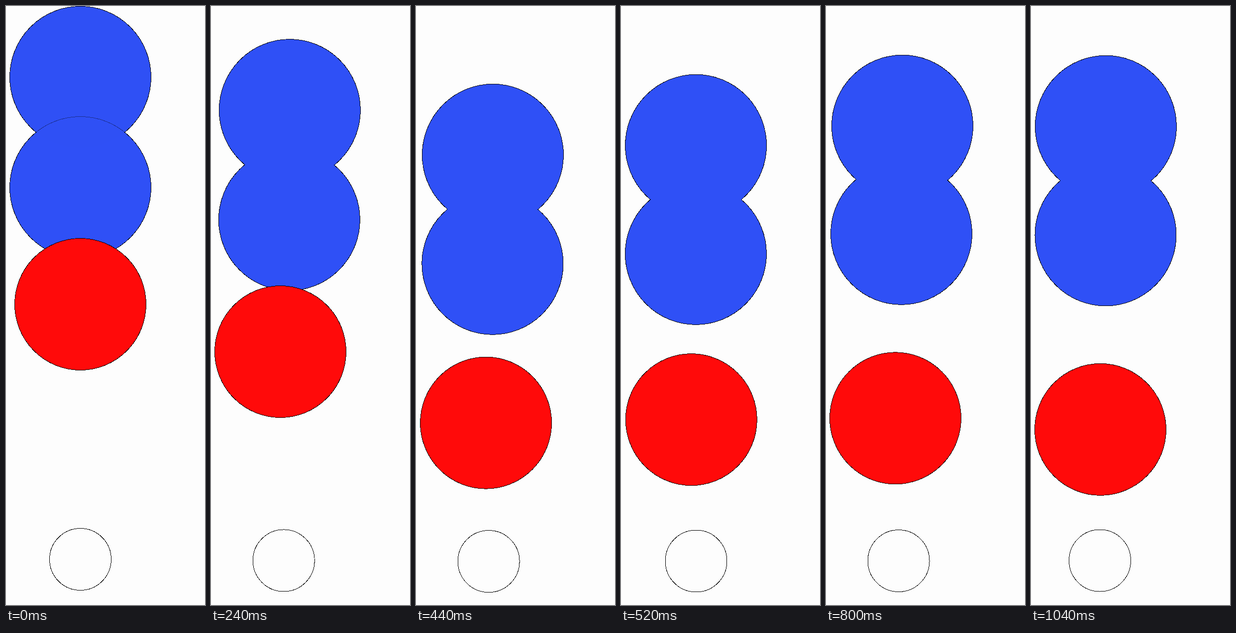
Write an HTML page that moves like this. It is 400x1200 px and loops after 1.08 s.

```html
<!DOCTYPE html>
<html lang="en">
<head>
<meta charset="utf-8">
<title>Bouncing balls</title>
<style>
  html, body { margin: 0; width: 100%; height: 100%; overflow: hidden; background: #fdfdfd; }
  svg { display: block; width: 100vw; height: 100vh; }
  circle { stroke: #000; stroke-width: 1; shape-rendering: crispEdges; }
  .blue { fill: #2f50f6; }
  .red { fill: #ff0a0a; }
  .small { fill: none; }
  #cover { stroke: none; }
</style>
</head>
<body>
<svg viewBox="0 0 400 1200">
  <circle id="top" class="blue" r="142"/>
  <circle id="mid" class="blue" r="142"/>
  <circle id="cover" class="blue" r="141.5"/>
  <circle id="red" class="red" r="132"/>
  <circle id="small" class="small" r="62"/>
</svg>
<script>
const LOOP = 1080, STEP = 40, HIT = 360, HALF = LOOP / 2, WALL = 7;
const BLUE_X = WALL + 142.5, RED_X = WALL + 132.5;

// Accelerating fall until the hit, then free flight with speed v and gravity g
function flight(t, { start, drop, power, base = start + drop, v, g }) {
  if (t <= HIT) return start + drop * (t / HIT) ** power;
  const s = t - HIT;
  return base + v * s + g * s * s / 2;
}

// Sideways arc away from the left wall
function hop(t, from, to, size) {
  return t > from && t < to ? size * Math.sin(Math.PI * (t - from) / (to - from)) : 0;
}

const blueX = (t, first, second) =>
  BLUE_X + hop(t, 0, HALF, first) + hop(t, HALF, LOOP, second);

const balls = {
  top: t => [
    blueX(t, 9, 4),
    flight(t, { start: 142.5, drop: 178.5, power: 2.45, v: -.305, g: .000552 })
  ],
  mid: t => [
    blueX(t, 8, 2),
    flight(t, { start: 363.5, drop: 176.5, power: 2.48, v: -.32, g: .00059 })
  ],
  red: t => [
    RED_X + 10 * Math.max(0, 1 - t / 240) + hop(t, HIT, 800, 2),
    flight(t, { start: 597.5, drop: 230, power: 2.18, base: 844.3, v: -.13, g: .0004 })
  ],
  small: roll
};

// The small ball rolls between a few points: [time, x, y]
const path = [[0, 149.5, 1108.5], [HIT, 143.5, 1113], [520, 151, 1112], [1040, 138.5, 1111]];

function roll(t) {
  const i = Math.max(1, path.findIndex(p => p[0] >= t));
  const [t0, x0, y0] = path[i - 1], [t1, x1, y1] = path[i];
  const k = ((t - t0) / (t1 - t0)) ** 1.5;
  return [x0 + (x1 - x0) * k, y0 + (y1 - y0) * k];
}

const $ = id => document.getElementById(id);

function place(id, [x, y]) {
  $(id).setAttribute("cx", x.toFixed(2));
  $(id).setAttribute("cy", y.toFixed(2));
}

function draw(now) {
  const t = Math.floor(now % LOOP / STEP) * STEP;
  for (const id in balls) place(id, balls[id](t));
  // hides the seam between the blue balls as they fall
  place("cover", balls.top(t));
  $("cover").setAttribute("opacity", Math.min(1, .6 + t / 600));
}

let begin;
function tick(now) {
  begin ??= now;
  draw(now - begin);
  requestAnimationFrame(tick);
}
draw(0);
requestAnimationFrame(tick);
</script>
</body>
</html>
```
